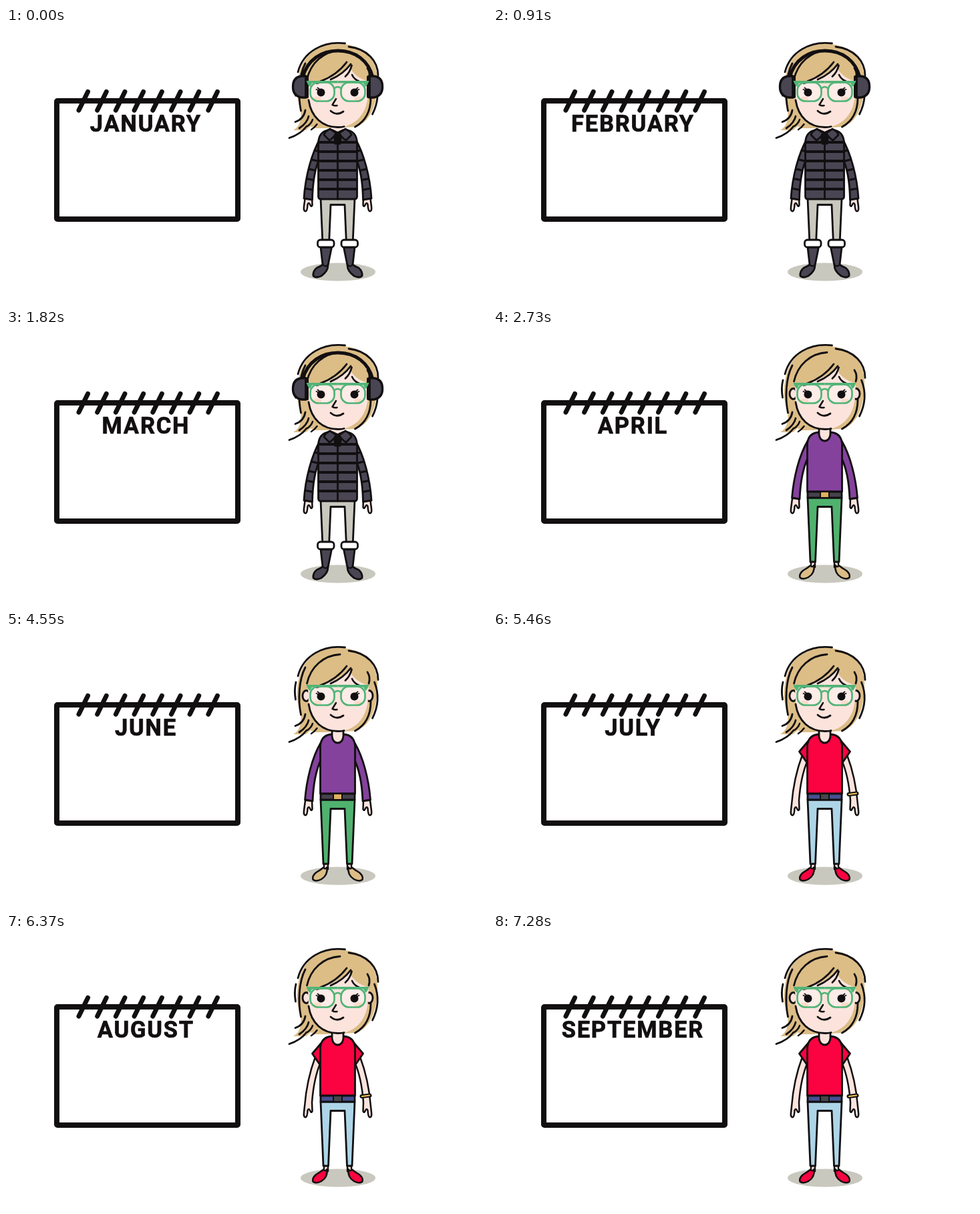
Animation of 720x410 px, one loop 8000 ms. Source, as an HTML page with a canvas:

```html
<!DOCTYPE html>
<html lang="en">
<head>
<meta charset="utf-8">
<title>Dressing by month</title>
<style>
html, body { margin: 0; width: 100%; height: 100%; overflow: hidden; background: #fff; }
canvas { display: block; width: 720px; height: 410px; }
</style>
</head>
<body>
<canvas id="stage"></canvas>
<script>
const canvas = document.getElementById('stage');
const ctx = canvas.getContext('2d');
const ratio = window.devicePixelRatio || 1;
canvas.width = 720 * ratio;
canvas.height = 410 * ratio;

const LOOP = 8000, MONTH_MS = 910, AXIS = 496.5;
const MONTHS = ['JANUARY', 'FEBRUARY', 'MARCH', 'APRIL', 'MAY', 'JUNE', 'JULY', 'AUGUST', 'SEPTEMBER'];
const INK = '#120f11', SKIN = '#fce4dd', HAIR = '#dcbd86', GREEN = '#50b477';
const STONE = '#c9c8be', SLATE = '#494553';

const SEASONS = [
  { draw: winter, trousers: STONE, earmuffs: true },
  { draw: spring, trousers: '#50b26f', top: '#84429d', belt: '#45424c', buckle: '#dfb160', shoes: HAIR },
  { draw: summer, trousers: '#add5e7', top: '#fb0340', belt: '#46508f', buckle: '#45474a', shoes: '#fb0340' }
];

function shape(d, fill, stroke = INK, width = 2.8) {
  const path = new Path2D(d);
  if (fill) { ctx.fillStyle = fill; ctx.fill(path); }
  if (stroke) { ctx.strokeStyle = stroke; ctx.lineWidth = width; ctx.stroke(path); }
}

const line = (d, width = 2.8, color = INK) => shape(d, null, color, width);

function ellipse(x, y, rx, ry, fill, stroke) {
  ctx.beginPath();
  ctx.ellipse(x, y, rx, ry, 0, 0, Math.PI * 2);
  ctx.fillStyle = fill;
  ctx.fill();
  if (stroke) { ctx.strokeStyle = stroke; ctx.lineWidth = 2.8; ctx.stroke(); }
}

function box(x, y, w, h, r, fill, stroke = INK, width = 2.8) {
  ctx.beginPath();
  ctx.roundRect(x, y, w, h, r);
  if (fill) { ctx.fillStyle = fill; ctx.fill(); }
  if (stroke) { ctx.strokeStyle = stroke; ctx.lineWidth = width; ctx.stroke(); }
}

// Draws the left part, then its reflection.
function bothSides(draw) {
  draw();
  ctx.save();
  ctx.translate(AXIS * 2, 0);
  ctx.scale(-1, 1);
  draw();
  ctx.restore();
}

function calendar(month) {
  box(76, 109, 271, 177, 1, '#fff', INK, 8);
  for (let i = 0; i < 8; i++) {
    const x = 109 + i * 27.7;
    line(`M${x} 123L${x + 13.5} 95.5`, 7);
  }
  ctx.font = '700 34.5px Roboto, sans-serif';
  ctx.letterSpacing = '1.8px';
  ctx.textAlign = 'left';
  ctx.fillStyle = ctx.strokeStyle = INK;
  ctx.lineWidth = 0.7;
  const text = MONTHS[month];
  const x = 208.5 - (ctx.measureText(text).width - 1.8) / 2;
  ctx.fillText(text, x, 155);
  ctx.strokeText(text, x, 155);
}

function hairBack() {
  shape('M438 72C445 36 472 22 502 24C536 26 555 46 556 76C557 100 551 140 523 148L480 150L462 150L456 147L449 153L430 153Q444 145 441 122C435 105 434 90 438 72Z', HAIR, null);
}

function hand() {
  shape('M448 252L446 267Q445 275 449 274Q451 273 451.5 264Q453 260 455 264Q457 269 458.5 265L458 252Z', SKIN, INK, 2.5);
}

function legs(color, top) {
  shape(`M471 ${top}L475 347H482.5L486 264.5H507L510.5 347H518L522 ${top}Z`, color);
}

function shoes(color) {
  bothSides(() => {
    shape('M476 346V355H482V346Z', SKIN, INK, 2.4);
    shape('M475 352.5Q478 356 480.5 352Q482 364 472 370Q464 374 459.5 370.5Q458 365 464 360Q471 356 475 352.5Z', color, INK, 2.5);
  });
}

function torso(look) {
  shape('M488 153Q472 154 470.5 170V242H522.5V170Q521 154 505 153Z', look.top);
  shape('M488 145V156Q489 165.5 496.5 166Q504 165.5 505 156V145Z', SKIN);
  box(471, 242, 51, 9, 0, look.belt);
  box(490, 242, 13, 9, 0, look.buckle, INK, 2);
}

function spring(look) {
  shoes(look.shoes);
  legs(look.trousers, 251);
  bothSides(() => {
    hand();
    shape('M471 166C458 188 450 221 447.5 251L459 253C460 228 464 206 472 190Z', look.top);
  });
  torso(look);
}

function summer(look) {
  shoes(look.shoes);
  legs(look.trousers, 251);
  bothSides(() => {
    shape('M463 184C454 208 449 232 447 258L446 267Q445 275 449 274Q451 273 451.5 264Q453 260 455 264Q457 269 458.5 265L458 252C460 226 464 208 471 192Z', SKIN, INK, 2.5);
    shape('M472 163L458.5 179L469.5 195L472 192Z', look.top);
  });
  line('M532.5 243L544.5 241.5', 6);
  line('M533 243L544 241.5', 2.2, '#edc64f');
  torso(look);
}

function winter(look) {
  legs(look.trousers, 255);
  bothSides(() => {
    shape('M471 328H487.5L482 355Q482 364 472 371Q464 375 460 371Q459 364 465 359Q472 356 474 354Z', SLATE);
    line('M474 354Q478 358 481 355', 2.2);
    box(466.5, 317, 24.5, 11, 4, '#fff');
    hand();
    const sleeve = 'M471 164C457 188 448 223 446 255L458.5 257C459 232 462 210 470 194Z';
    shape(sleeve, SLATE);
    ctx.save();
    ctx.clip(new Path2D(sleeve));
    for (let y = 180; y < 250; y += 15) line(`M445 ${y}Q456 ${y + 1} 473 ${y + 6}`, 3);
    ctx.restore();
  });
  shape('M481 153Q468 156 467.5 172V252Q467.5 256 471 256H522Q525.5 256 525.5 252V172Q525 156 512 153Z', SLATE);
  for (let y = 171; y < 250; y += 14) line(`M468 ${y}H525`, 3.8);
  line('M496.5 160V256');
  shape('M490 151H503L500 173H493Z', INK);
  shape('M488 146V151L496.5 155L505 151V146Z', SKIN, null);
  bothSides(() => shape('M485 151Q477 155 476 160L484 168Q491 164 494 157Z', SLATE));
}

function glasses() {
  bothSides(() => {
    box(455.5, 81.5, 36, 28, 12, 'rgba(255,255,255,.28)', GREEN, 2.7);
    shape('M449.5 79H496.5V82.5H458L455 88Q452 86 449.5 79Z', GREEN, null);
  });
  line('M491 91Q496.5 85 502 91', 2.4, GREEN);
}

function eyes() {
  bothSides(() => {
    ellipse(471.5, 96.5, 6, 6, INK);
    line('M464.5 92L470 94M466.5 89.5L471 93', 1.8);
  });
}

function face() {
  bothSides(() => ellipse(449.5, 95.5, 5.5, 8, SKIN, INK));
  shape('M452 84Q490 78 514 57Q521 74 543 80L542 100C540 131 520 148.5 497 148.5C474 148.5 457 134 453 109Z', SKIN, null);
  line('M453 108C457 134 474 148.5 497 148.5Q503 148.5 506 147.5');
  bothSides(() => ellipse(466, 106, 6, 3.5, '#f9cdb2'));
  line('M494 106L488.5 115Q492 117 495.5 116', 2.5);
  line('M486 124Q495 132 505 125');
  line('M465 83L472 81', 2.5);
  line('M518 70Q521 77 529 80', 2.6);
}

function strands() {
  line('M437 66C445 35 475 19 507.5 23');
  line('M513 28C541 31 557 50 557 71.5');
  line('M433.5 101Q431 87 434 75');
  line('M470 80Q495 71 510 51');
  line('M486 77Q505 69 516 54');
  line('M508 72.5Q515 66 517.5 56');
  line('M541 60Q546 68 543 77');
  line('M551.5 75C560 96 556 114 548.5 129');
  line('M546 104C546 124 539 139 522.5 148');
  line('M450.5 77C456 52 475 35 500 33.5');
  line('M448 53C438 72 437 102 441.5 124');
  line('M424 164.5Q441 159 450 147');
  line('M433 140.5Q446 136 448 123');
  line('M439 150Q451 142 453 132');
  line('M457 152Q462 149 465.5 144', 2.5);
  line('M451 147Q457 143 459 137', 2.5);
}

function earmuffs() {
  line('M444 74C451 47 473 34 497 34C523 34 543 49 549 74', 5);
  bothSides(() => {
    shape('M449 72H443Q429.5 73 429.5 88Q429.5 102 443 104H449Z', SLATE, INK, 3.4);
    box(447.5, 71, 5.5, 34, 2, INK, null);
  });
}

function person(look) {
  ellipse(497, 365, 56, 13.5, STONE);
  hairBack();
  look.draw(look);
  face();
  strands();
  if (look.earmuffs) earmuffs();
  glasses();
  eyes();
}

function frame(now) {
  const month = Math.floor((now % LOOP) / MONTH_MS);
  ctx.setTransform(ratio, 0, 0, ratio, 0, 0);
  ctx.lineCap = ctx.lineJoin = 'round';
  ctx.fillStyle = '#fff';
  ctx.fillRect(0, 0, 720, 410);
  calendar(month);
  person(SEASONS[Math.floor(month / 3)]);
}

const start = performance.now();
function tick() {
  frame(performance.now() - start);
  requestAnimationFrame(tick);
}
tick();
</script>
</body>
</html>
```
